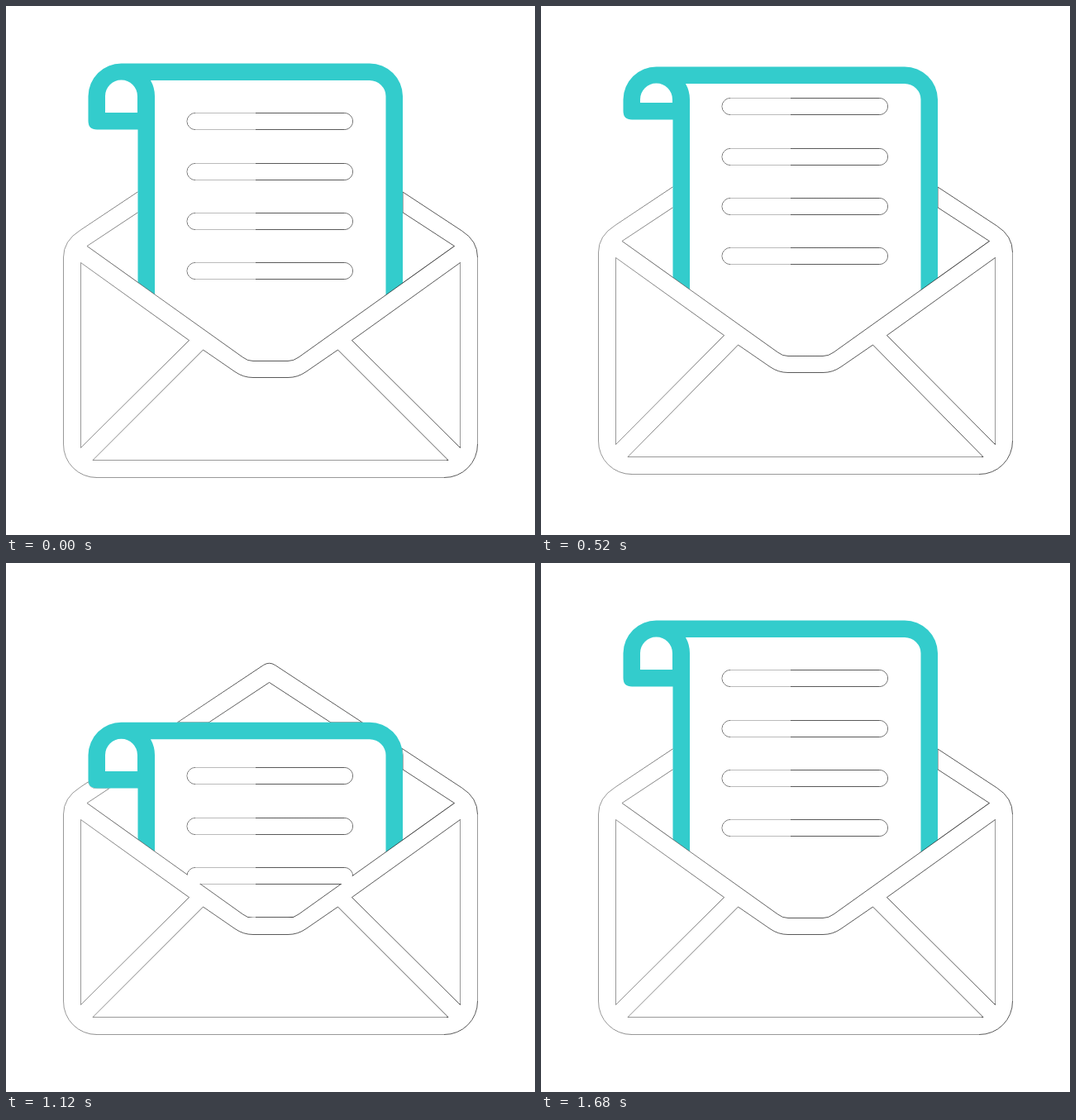
Write an HTML page that moves like this. It is 640 px wide and 640 px high and loops after 1.72 s.

```html
<!DOCTYPE html>
<html lang="en">
<head>
<meta charset="utf-8">
<title>Letter in envelope</title>
<style>
  html, body { margin: 0; width: 100%; height: 100%; overflow: hidden; background: #fff; }
  svg { display: block; width: 100vw; height: 100vh; }
  .line { fill: none; stroke: url(#ink); stroke-width: .75; }
  .soft { fill: none; stroke: #999; shape-rendering: crispEdges; }
  .pale { fill: none; stroke: #bbb; shape-rendering: crispEdges; }
  .white { fill: #fff; }
  .teal { fill: #33cccc; fill-rule: evenodd; }
</style>
</head>
<body>
<svg viewBox="0 0 640 640">
  <defs>
    <linearGradient id="ink" gradientUnits="userSpaceOnUse" x1="70" y1="0" x2="302" y2="0">
      <stop offset="0" stop-color="#777"/>
      <stop offset="1" stop-color="#222"/>
    </linearGradient>
    <clipPath id="band"><path id="bandShape" clip-rule="evenodd"/></clipPath>
    <clipPath id="mouth"><path id="mouthShape"/></clipPath>
  </defs>
  <path id="shell" class="line"/>
  <path id="inside" class="line"/>
  <path id="rim" class="line" clip-path="url(#band)"/>
  <path id="sheet" class="white"/>
  <path id="border" class="teal"/>
  <path id="barsLeft" class="pale"/>
  <path id="barsRight" class="line"/>
  <path id="front" class="white"/>
  <path id="fold" class="line"/>
  <path id="barFill" class="white" clip-path="url(#mouth)"/>
  <path id="panels" class="line"/>
  <path id="edges" class="soft"/>
</svg>
<script>
const LOOP = 1720, STEP = 40;

// [time, vertical offset] for each moving part
const tracks = {
  top:   [[0, 0], [280, -38], [360, -31], [560, 13], [720, 44], [960, 92], [1200, 130], [1680, 0]],
  curl:  [[0, 0], [290, -47], [360, -42], [720, 38], [960, 90.5], [1200, 130], [1680, 0]],
  text:  [[0, 0], [300, -52], [360, -48], [720, 32], [960, 84], [1200, 125], [1680, 0]],
  flap:  [[0, 0], [290, -29], [360, -23], [720, 7], [960, 0]],
  base:  [[0, 0], [290, -23], [360, -18.5], [600, 0]]
};

// Monotone cubic: flat at the ends and at every turning point
function slope(keys, i) {
  if (i === 0 || i === keys.length - 1) return 0;
  const rate = j => (keys[j + 1][1] - keys[j][1]) / (keys[j + 1][0] - keys[j][0]);
  const a = rate(i - 1), b = rate(i);
  return a * b > 0 ? 2 * a * b / (a + b) : 0;
}

function sample(keys, t) {
  const last = keys.length - 1;
  if (t >= keys[last][0]) return keys[last][1];
  let i = 0;
  while (t >= keys[i + 1][0]) i++;
  const [t0, v0] = keys[i], [t1, v1] = keys[i + 1];
  const h = t1 - t0, s = (t - t0) / h, q = s * s * (3 - 2 * s);
  return v0 + (v1 - v0) * q
    + h * s * (1 - s) * ((1 - s) * slope(keys, i) - s * slope(keys, i + 1));
}

const set = (id, d) => document.getElementById(id).setAttribute("d", d);

function foldPath(y) {
  return `L286.5,${y + 425} Q292,${y + 429.5} 299,${y + 429.5} H341
    Q348,${y + 429.5} 354,${y + 425} L542.5,${y + 290.5}`;
}

function drawEnvelope(u, b) {
  const shell = `M69.5,${530 + b} V${304 + u} Q69.5,${284 + u} 89.5,${271.5 + u}
    L311.5,${123.5 + u} Q318.5,${119 + u} 325.5,${123.5 + u} L551.5,${272 + u}
    Q570.5,${284 + u} 570.5,${304 + u} V${530 + b} A40,40 0 0 1 530,${570.5 + b}
    H110 A40,40 0 0 1 69.5,${530 + b} Z`;
  const fold = `M98,${290.5 + u} ${foldPath(u)}`;
  const inside = `${fold} L318.5,${144.5 + u} Z`;
  set("shell", shell);
  set("inside", inside);
  set("bandShape", shell + inside);
  set("front", `${fold} V${540 + b} H98 Z`);
  set("fold", fold);
  set("mouthShape", `M98,0 V${309 + u} ${foldPath(u + 19)} V0 Z`);
  set("panels", `M90.5,${310.5 + u} L221.5,${404.5 + u} L90.5,${534.5 + b} Z
    M549.5,${310.5 + u} L418.5,${404.5 + u} L549.5,${534.5 + b} Z
    M238.5,${416 + u} L277,${442.5 + u} Q287,${449.5 + u} 299,${449.5 + u} H341
    Q353,${449.5 + u} 363,${442.5 + u} L401.5,${416 + u} L535,${549.5 + b} H105 Z`);
  set("edges", `M69.5,${530 + b} V${304 + u} M570.5,${530 + b} V${304 + u}
    M110,${570.5 + b} H530 M90.5,${311 + u} V${533 + b}
    M549.5,${311 + u} V${533 + b} M107,${549.5 + b} H533`);
}

function drawPaper(p, c, u) {
  const foot = 440 + u;
  const crown = `M99.5,${109 + p} A40,40 0 0 1 139.5,${69.5 + p} H440 A40,40 0 0 1 480,${109 + p}`;
  const tail = `H159.5 V${149.5 + c} H110 Q99.5,${149.5 + c} 99.5,${139 + c} Z`;
  set("rim", `${crown} V${foot} M99.5,${139 + c} Q99.5,${149.5 + c} 110,${149.5 + c} H159.5`);
  set("sheet", `${crown} V${foot} ${tail}`);
  set("border", `${crown} V${foot} H459.5 V${109 + p} A20,19 0 0 0 440,${90 + p} H175
    Q180,${99 + p} 180,${109 + p} V${foot} ${tail}
    M120,${129 + c} V${109 + p} A19.5,19.5 0 0 1 159,${109 + p} V${129 + c} Z`);
}

function drawBars(y) {
  let left = "", right = "", fill = "";
  for (const row of [129.5, 190.5, 250.5, 310.5]) {
    const a = row + y, z = a + 20;
    left += `M302,${a} H229 M302,${z} H229`;
    // the rounded left ends are as dark as the right half
    right += `M302,${a} H409.5 a10,10 0 0 1 0,20 H302 M229,${a} a10,10 0 0 0 0,20`;
    fill += `M229,${a + .5} H409.5 a9.5,9.5 0 0 1 0,19 H229 a9.5,9.5 0 0 1 0,-19 Z`;
  }
  set("barsLeft", left);
  set("barsRight", right);
  set("barFill", fill);
}

const start = performance.now();
function draw() {
  const now = Math.max(0, performance.now() - start) % LOOP;
  const t = Math.floor(now / STEP) * STEP;
  const at = name => sample(tracks[name], t);
  // whole pixels keep the hairlines even
  const snap = name => Math.round(at(name));
  const flap = snap("flap");
  drawEnvelope(flap, snap("base"));
  drawPaper(at("top"), at("curl"), flap);
  drawBars(snap("text"));
  requestAnimationFrame(draw);
}
draw();
</script>
</body>
</html>
```
